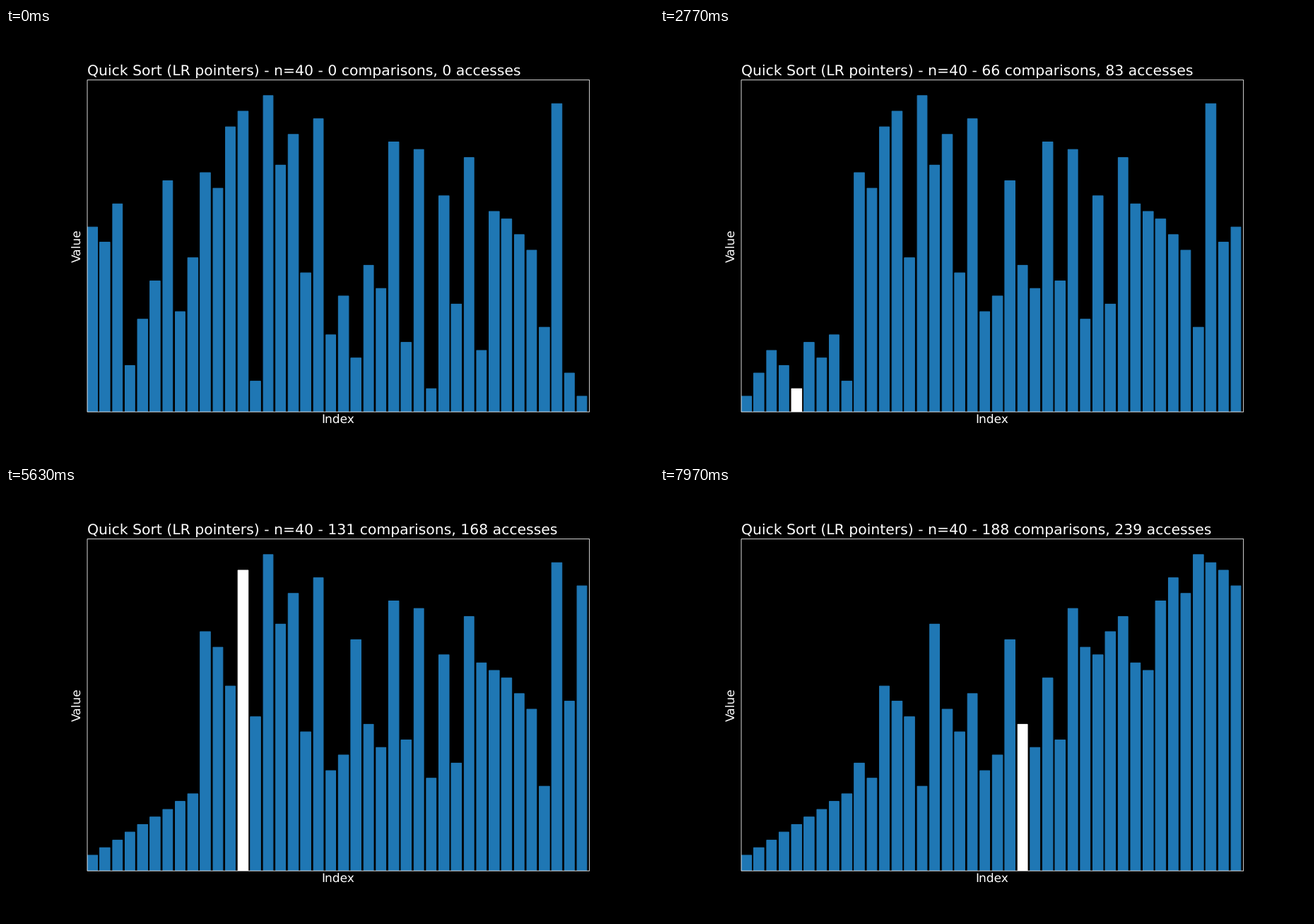
Write a matplotlib script that moves like this. It is 917 by 611 pixels and loops after 8000 ms.

```python
import itertools

import matplotlib.pyplot as plt
import numpy as np
from matplotlib.animation import FuncAnimation
from matplotlib.patches import Rectangle

W, H, DPI = 917, 611, 72
FRAMES, LOOP_MS = 240, 8000
BLUE, ACTIVE = "#1f77b4", "white"

# Layout grid: 1200 x 800 units with y pointing down; PT is one point in pixels.
LEFT, RIGHT, TOP, BOTTOM = 150, 1080, 96, 712
PT = W / 1200 * 100 / 72

VALUES = [24, 22, 27, 6, 12, 17, 30, 13, 20, 31, 29, 37, 39, 4, 41, 32, 36, 18, 38, 10,
          15, 7, 19, 16, 35, 9, 34, 3, 28, 14, 33, 8, 26, 25, 23, 21, 11, 40, 5, 2]
N = len(VALUES)


def quick_sort(a, lo, hi):
    """Sort a in place, yielding (index, is_read) for every array access."""
    mid = (lo + hi) // 2
    pivot = a[mid]
    yield mid, True
    i, j = lo, hi
    while i <= j:
        yield i, True
        while a[i] < pivot:
            i += 1
            yield i, True
        yield j, True
        while a[j] > pivot:
            j -= 1
            yield j, True
        if i <= j:
            yield i, True
            yield j, True
            left, right = a[i], a[j]
            a[i] = right
            yield i, False
            a[j] = left
            yield j, False
            i += 1
            j -= 1
    if lo < j:
        yield from quick_sort(a, lo, j)
    if i < hi:
        yield from quick_sort(a, i, hi)


def record():
    """List of (values, active index, reads so far), one entry per frame."""
    a = list(VALUES)
    steps, reads = [(list(a), None, 0)], 0
    for index, is_read in itertools.islice(quick_sort(a, 0, N - 1), FRAMES - 1):
        steps.append((list(a), index, reads))
        reads += is_read
    return steps


def snap(v):
    return np.floor(np.asarray(v) + 0.5) + 0.5


def bar_top(values):
    scale = (BOTTOM - TOP) / (1.05 * max(VALUES))
    return snap(BOTTOM - scale * np.array(values))


plt.rcParams.update({
    "font.family": "DejaVu Sans",
    "font.size": 16 * PT,
    "text.hinting": "none",
    "text.color": "white",
    "axes.labelcolor": "white",
    "axes.facecolor": "black",
    "figure.facecolor": "black",
    "savefig.facecolor": "black",
})

fig = plt.figure(figsize=(W / DPI, H / DPI), dpi=DPI)
ax = fig.add_axes([0.125, 0.11, 0.775, 0.77])
ax.set_xticks([])
ax.set_yticks([])
ax.spines[:].set_visible(False)
ax.set_xlabel("Index", labelpad=4 * PT)
ax.set_ylabel("Value", labelpad=4 * PT)
title = ax.set_title("", loc="left", pad=6 * PT, fontsize=19.2 * PT)

slot = (RIGHT - LEFT) / N
x0 = snap(LEFT + slot * np.arange(N))
x1 = snap(LEFT + slot * (np.arange(N) + 0.8))
floor_y = BOTTOM + 0.5
bars = ax.bar(x0, bar_top(VALUES) - floor_y, x1 - x0, bottom=floor_y, align="edge",
              color=BLUE, edgecolor=BLUE, linewidth=PT, snap=False)
ax.add_patch(Rectangle((LEFT + 0.5, TOP + 0.5), RIGHT - LEFT, BOTTOM - TOP, fill=False,
                       edgecolor="white", linewidth=0.8 * PT, snap=False,
                       clip_on=False, zorder=3))
ax.set_xlim(LEFT, RIGHT)
ax.set_ylim(BOTTOM, TOP)

STEPS = record()


def update(frame):
    values, active, reads = STEPS[frame]
    for k, (bar, top) in enumerate(zip(bars, bar_top(values))):
        bar.set_height(top - floor_y)
        bar.set_color(ACTIVE if k == active else BLUE)
    title.set_text(f"Quick Sort (LR pointers) - n={N} - "
                   f"{reads} comparisons, {frame} accesses")
    return [title, *bars]


anim = FuncAnimation(fig, update, frames=FRAMES, init_func=lambda: update(0),
                     interval=LOOP_MS / FRAMES, repeat=True, repeat_delay=0, blit=False)
plt.show()
```
